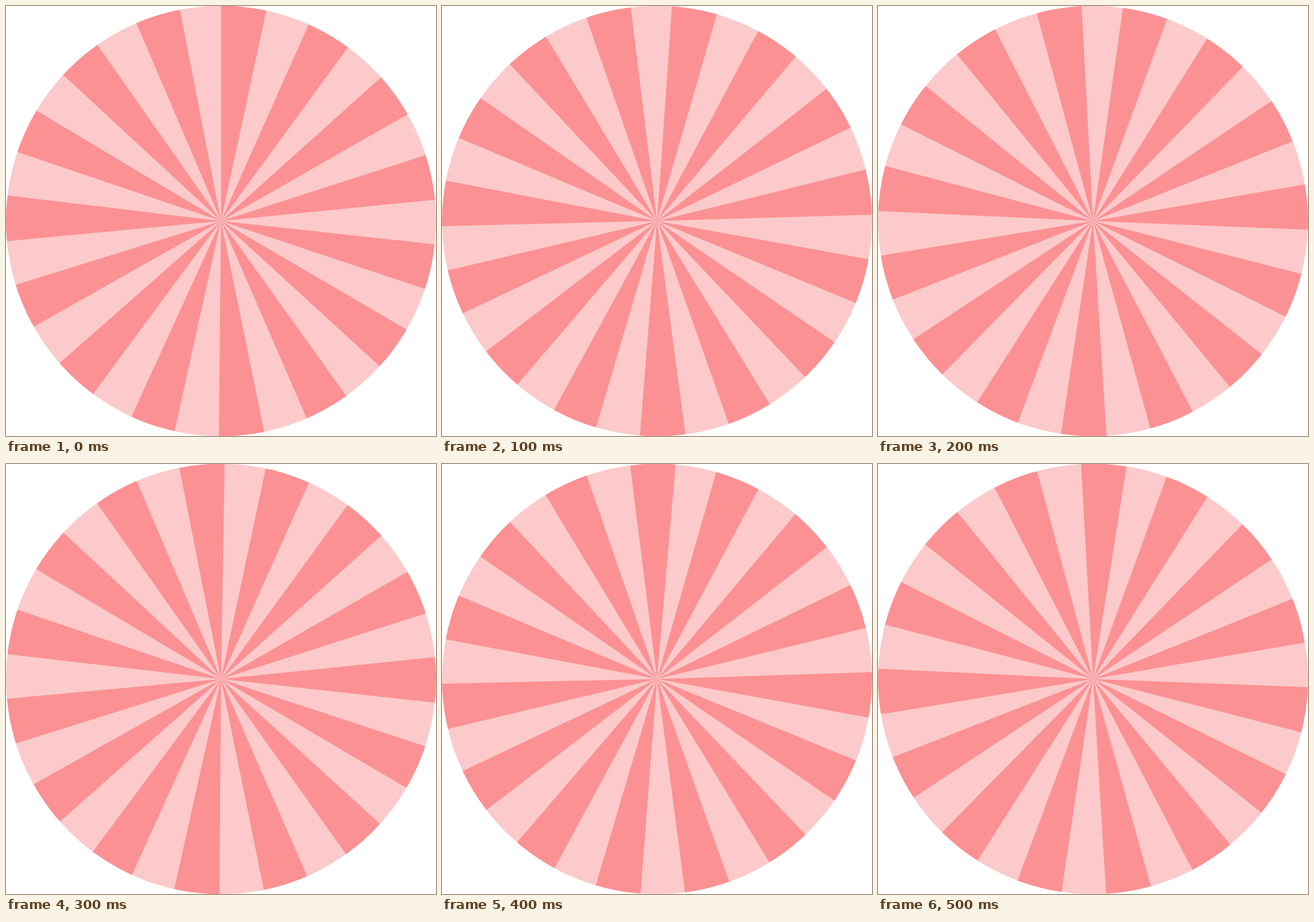
An HTML page for the animation above (600 ms loop, 749 by 748 pixels).

```html
<!DOCTYPE html>
<html lang="en">
<head>
<meta charset="utf-8">
<title>Sunburst</title>
<style>
  html, body { margin: 0; width: 100%; height: 100%; overflow: hidden; background: #fff; }
  svg { display: block; width: 100%; height: 100%; }
</style>
</head>
<body>
<svg viewBox="0 0 749 748">
  <defs><clipPath id="disc"><circle cx="374.5" cy="374" r="374.4"/></clipPath></defs>
  <g clip-path="url(#disc)">
    <rect width="749" height="748" fill="#fccacb"/>
    <path id="rays" fill="#fc9193"/>
  </g>
</svg>
<script>
const CX = 374.5, CY = 374, REACH = 400;
const RAYS = 15, PITCH = 24.058, WIDTH = 12.16;
const STEP_MS = 100, STEPS = 6, STEP_DEG = 4;
const rays = document.getElementById('rays');

// Angles run clockwise from twelve o'clock.
function point(deg) {
  const a = deg * Math.PI / 180;
  return `${(CX + REACH * Math.sin(a)).toFixed(2)} ${(CY - REACH * Math.cos(a)).toFixed(2)}`;
}

function ray(i) {
  const start = i * PITCH;
  return `M${CX} ${CY}L${point(start)}L${point(start + WIDTH)}Z`;
}

rays.setAttribute('d', Array.from({ length: RAYS }, (_, i) => ray(i)).join(''));

// The wheel ticks round in even steps; one loop is one ray pitch.
function draw(ms) {
  const step = Math.floor(ms / STEP_MS) % STEPS;
  rays.setAttribute('transform', `rotate(${step * STEP_DEG} ${CX} ${CY})`);
}

const begin = performance.now();
function tick() {
  draw(performance.now() - begin);
  requestAnimationFrame(tick);
}
tick();
</script>
</body>
</html>
```
